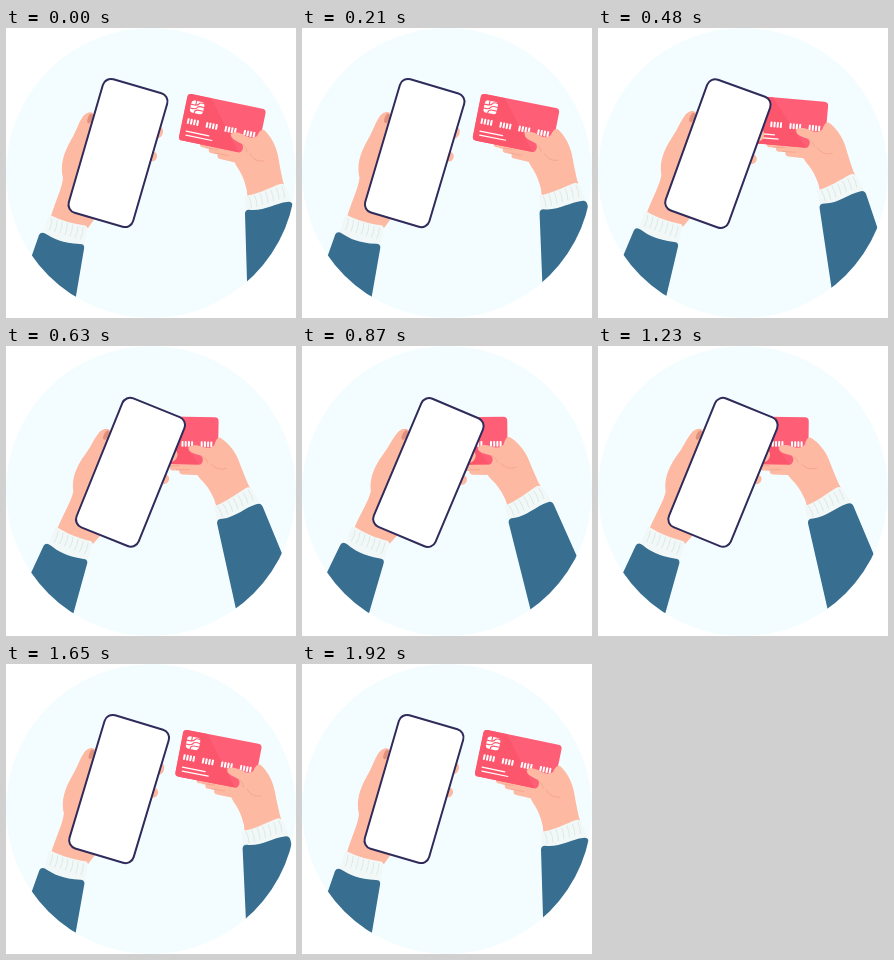
Animation of 290x290 px, one loop 1950 ms. Source, as an HTML page with a canvas:

```html
<!DOCTYPE html>
<html lang="en">
<head>
<meta charset="utf-8">
<title>Card payment by phone</title>
<style>
  html, body { margin: 0; width: 100%; height: 100%; overflow: hidden; background: #fff; }
  canvas { display: block; width: 290px; height: 290px; }
</style>
</head>
<body>
<canvas id="stage"></canvas>
<script>
const SIZE = 290, LOOP = 1950, STEP = 30;
const canvas = document.getElementById('stage');
const ctx = canvas.getContext('2d');
const ratio = window.devicePixelRatio || 1;
canvas.width = canvas.height = SIZE * ratio;

const COLOR = {
  disc: '#f3fdff', skin: '#fdb9a2', shade: '#f2a08b', nail: '#e0907c',
  sleeve: '#386f91', cuff: '#f1f8f7', rib: '#d8e6e2',
  card: '#ff5f76', cardDark: '#fc566d', ink: '#2f2b5a'
};

const rad = deg => deg * Math.PI / 180;
const cubic = x => x < 0.5 ? 4 * x ** 3 : 1 - 4 * (1 - x) ** 3;

function fill(d, color) {
  ctx.fillStyle = color;
  ctx.fill(new Path2D(d));
}

function line(d, color, width) {
  ctx.strokeStyle = color;
  ctx.lineWidth = width;
  ctx.lineCap = ctx.lineJoin = 'round';
  ctx.stroke(new Path2D(d));
}

function box(x, y, w, h, r) {
  ctx.beginPath();
  ctx.roundRect(x, y, w, h, r);
}

function oval(x, y, rx, ry, deg, color) {
  ctx.beginPath();
  ctx.ellipse(x, y, rx, ry, rad(deg), 0, 2 * Math.PI);
  ctx.fillStyle = color;
  ctx.fill();
}

function placed(x, y, deg, draw) {
  ctx.save();
  ctx.translate(x, y);
  ctx.rotate(rad(deg));
  draw();
  ctx.restore();
}

// Turn a whole arm around its pivot
function turned(x, y, deg, draw) {
  placed(x, y, deg, () => {
    ctx.translate(-x, -y);
    draw();
  });
}

// Short wavy ribs between the two edges of a cuff
function ribs(x0, y0, x1, y1, dx, dy, count) {
  for (let i = 0; i < count; i++) {
    const k = i / (count - 1);
    const x = x0 + (x1 - x0) * k, y = y0 + (y1 - y0) * k;
    line(`M${x},${y} q${dx / 2 + 1.2},${dy / 2} ${dx},${dy}`, COLOR.rib, 0.8);
  }
}

function card() {
  box(0, 0, 80, 47.5, 4);
  ctx.fillStyle = COLOR.card;
  ctx.fill();
  ctx.save();
  ctx.clip();
  fill('M0,0 H24 L62,48 H0 Z', COLOR.cardDark);
  ctx.restore();

  box(5.2, 5.6, 13.4, 12.6, 3.4);
  ctx.fillStyle = '#fff';
  ctx.fill();
  line('M5,10 h4 q3,0 4,-2 t5.5,-1 M5,14 h3 q3,0 4,-2 t6.5,-1.2 M10,18 q0,-3 3,-3.5 h5.5 M10,5.5 v4', COLOR.cardDark, 1.1);

  ctx.fillStyle = '#fff';
  for (let i = 0; i < 16; i++) {
    const x = 4.9 + Math.floor(i / 4) * 19.2 + (i % 4) * 3.2;
    box(x, 24.2, 2, 5.8, 0.8);
    ctx.fill();
  }
  line('M6,37.4 H29', '#fff', 1.3);
  line('M6.5,41.3 H33', '#fff', 1.2);
}

function cardArm() {
  fill('M241,163 L277,154 L284,172 L242,180 Z', COLOR.skin);
  line('M215,127.5 L234,132', COLOR.skin, 7);
  line('M206,122 L232,126', COLOR.skin, 6.5);
  line('M197,116.5 L230,121', COLOR.skin, 6);
  line('M209,125.3 L222,127.5 M200,120 L212,121.5', COLOR.shade, 0.7);

  placed(182, 65.3, 11.8, card);

  fill('M225,106 C227,103 233,104 238,107 C243,110 247,111 251,108 ' +
       'C253,104 255,101 258,102 C264,107 270,117 272,128 C274,140 276,149 278,158 ' +
       'L242,168 C240,158 238,150 233,142 C229,136 227,132 229,127 ' +
       'C235,125 239,121 236,116 C231,113 224,111 225,106 Z', COLOR.skin);
  line('M236,116 C239,118 241,121 241,124 M244,126 C247,131 252,134 258,133', COLOR.shade, 0.7);

  fill('M238.5,168 C250,167 263,160 274,156 Q278,155 280,159 L286,176 ' +
       'C272,180 256,185 240,185 Z', COLOR.cuff);
  ribs(243, 169, 276, 158.5, 2.5, 11, 7);
  fill('M239,186 Q239,181 245,182 C258,183 270,175 281,174 Q286,173 287,178 ' +
       'L298,231 L320,320 H243 Z', COLOR.sleeve);
}

function phone() {
  box(-33.5, -69.5, 67, 139, 8.5);
  ctx.fillStyle = '#fff';
  ctx.fill();
  ctx.strokeStyle = COLOR.ink;
  ctx.lineWidth = 2;
  ctx.stroke();
}

function phoneArm() {
  oval(152.5, 104.5, 4.3, 6, 20, COLOR.skin);
  oval(147, 128.5, 4, 4.8, 20, COLOR.skin);
  fill('M45,188 C50,172 56,160 57,150 C54,138 57,126 65,112 C70,104 72,96 76,90 ' +
       'C79,84 87,82 88,87 C88,93 86,99 84,105 L100,130 L92,186 L82,200 ' +
       'C68,199 56,194 45,188 Z', COLOR.skin);
  oval(84, 90.5, 2.2, 5, 20, COLOR.nail);

  fill('M44,187 C56,193 68,196 79,197.5 Q82,198 81,202 L78,218 ' +
       'C62,218 46,213 37,207 L42,189 Z', COLOR.cuff);
  ribs(46, 191, 77, 200, -2.5, 11, 7);
  fill('M33,207 Q35,203 40,206 C48,211 56,215 74,216 Q79,216 78,221 ' +
       'L70,268 L60,325 H-8 Z', COLOR.sleeve);

  placed(112, 125, 16.2, phone);
}

// 0 = card apart from the phone, 1 = card behind it
function progress(t) {
  if (t < 930) return cubic(t / 930);
  if (t < 950) return 1;
  return t < 1905 ? 1 - cubic((t - 950) / 955) : 0;
}

function draw(t) {
  const p = progress(t);
  ctx.setTransform(ratio, 0, 0, ratio, 0, 0);
  ctx.fillStyle = '#fff';
  ctx.fillRect(0, 0, SIZE, SIZE);
  ctx.save();
  ctx.beginPath();
  ctx.arc(145, 145, 145, 0, 2 * Math.PI);
  ctx.fillStyle = COLOR.disc;
  ctx.fill();
  ctx.clip();
  turned(182, 330, -12.4 * p, cardArm);
  turned(106, 249, 6.7 * p, phoneArm);
  ctx.restore();
}

const start = performance.now();
function tick() {
  const t = (performance.now() - start) % LOOP;
  draw(Math.floor(t / STEP) * STEP);
  requestAnimationFrame(tick);
}
tick();
</script>
</body>
</html>
```
